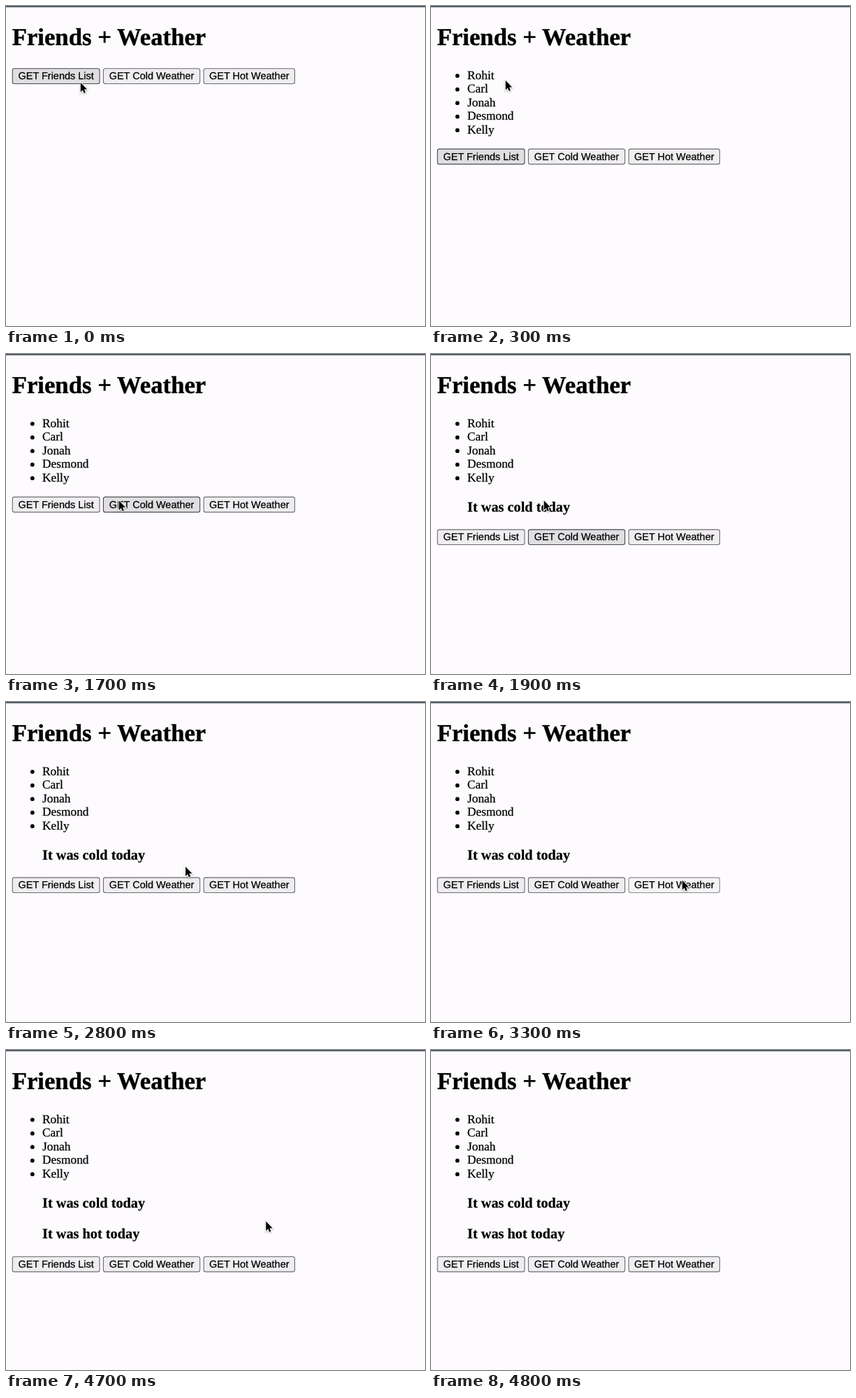
Recreate the animation shown at these times as an HTML page. Size 600x459 px, loop 5600 ms.

```html
<!DOCTYPE html>
<html lang="en">
<head>
<meta charset="utf-8">
<title>Friends + Weather</title>
<style>
  html, body { margin: 0; width: 100%; height: 100%; overflow: hidden; background: #fdfbfe; }
  svg { display: block; width: 600px; height: 459px; }
  text { font: 17.36px "Liberation Serif", Times, serif; text-rendering: geometricPrecision; stroke: #000; stroke-width: .25; }
  .h1 { font-size: 34.72px; font-weight: bold; stroke-width: .4; }
  .h3 { font-size: 20.31px; font-weight: bold; }
  .button text { font: 14.47px "Liberation Sans", Arial, sans-serif; }
  .button rect { fill: #efedf0; stroke: #6c6b6e; stroke-width: 1.1; }
  .button.hover rect { fill: #e0dee1; stroke: #4a494c; }
  .button.press rect { fill: #f5f3f6; stroke: #8d8c8f; }
  #cursor { filter: drop-shadow(0 1px 1px rgba(0, 0, 0, .3)); }
  #cursor path { stroke: #fff; stroke-width: 2; paint-order: stroke; }
</style>
</head>
<body>
<svg viewBox="0 0 600 459">
  <rect width="600" height="1.8" fill="#465660"/>
  <text class="h1" x="8.7" y="56.4">Friends + Weather</text>
  <g id="friends"></g>
  <text id="cold" class="h3" x="52" y="226.2">It was cold today</text>
  <text id="hot" class="h3" x="52" y="270.2">It was hot today</text>
  <g id="buttons"></g>
  <g id="cursor"><path d="M.3 .8V14.4L3.3 11.5L5.2 16L7.4 15L5.6 10.6H9.7Z"/></g>
</svg>
<script>
const $ = id => document.getElementById(id);
const LOOP = 5600, STEP = 100;

$('friends').innerHTML = ['Rohit', 'Carl', 'Jonah', 'Desmond', 'Kelly'].map((name, i) => {
  const y = 104.7 + i * 19.53;
  return `<circle cx="37.8" cy="${y - 4.6}" r="2.9"/><text x="52" y="${y}">${name}</text>`;
}).join('');

$('buttons').innerHTML = [
  ['GET Friends List', 8.7, 125.9],
  ['GET Cold Weather', 138.9, 139.3],
  ['GET Hot Weather', 282.6, 131.4]
].map(([label, x, w]) => `<g class="button">
  <rect x="${x + .55}" y=".55" width="${w - 1.1}" height="21.7" rx="2.7"/>
  <text x="${x + w / 2}" y="16.1" text-anchor="middle">${label}</text></g>`).join('');
const buttons = [...$('buttons').children];

const show = (el, on) => el.setAttribute('visibility', on ? 'visible' : 'hidden');
const move = (el, x, y) => el.setAttribute('transform', `translate(${x} ${y})`);
const mix = (a, b, p) => a + (b - a) * p;

function pointer(t) {
  if (t < 200) return [106.5, 109];
  if (t < 2700) {
    const u = Math.min(1, Math.max(0, (t - 1100) / 600));
    const p = u * u * (3 - 2 * u);
    return [mix(106.5, 161.5, p), mix(106, 209.5, p)];
  }
  if (t < 4700) {
    const u = Math.min(1, (t - 2700) / 600);
    const p = 1 - (1 - u) ** 3.6;
    return [mix(161.5, 359.5, p), mix(209.5, 255, p) + 4 * Math.sin(Math.PI * p)];
  }
  return [372, 245];
}

// Index of the button under the pointer, as last noticed by the page
function hovered(t) {
  if (t < 1200) return 0;
  if (t < 1700) return -1;
  if (t < 2800) return 1;
  if (t < 3000) return -1;
  return t < 4700 ? 2 : -1;
}

function draw(now) {
  const t = Math.floor(now % LOOP / STEP) * STEP;
  const stage = [300, 1900, 3400].filter(at => t >= at).length;
  show($('friends'), stage > 0);
  show($('cold'), stage > 1);
  show($('hot'), stage > 2);
  move($('buttons'), 0, [89.2, 204.6, 251.3, 295.9][stage]);

  const over = hovered(t);
  const pressed = [100, 1800, 3300].includes(t);
  buttons.forEach((b, i) =>
    b.setAttribute('class', 'button' + (i !== over ? '' : pressed ? ' press' : ' hover')));

  show($('cursor'), t < 4800);
  move($('cursor'), ...pointer(t));
}

const start = performance.now();
function tick() {
  draw(performance.now() - start);
  requestAnimationFrame(tick);
}
tick();
</script>
</body>
</html>
```
